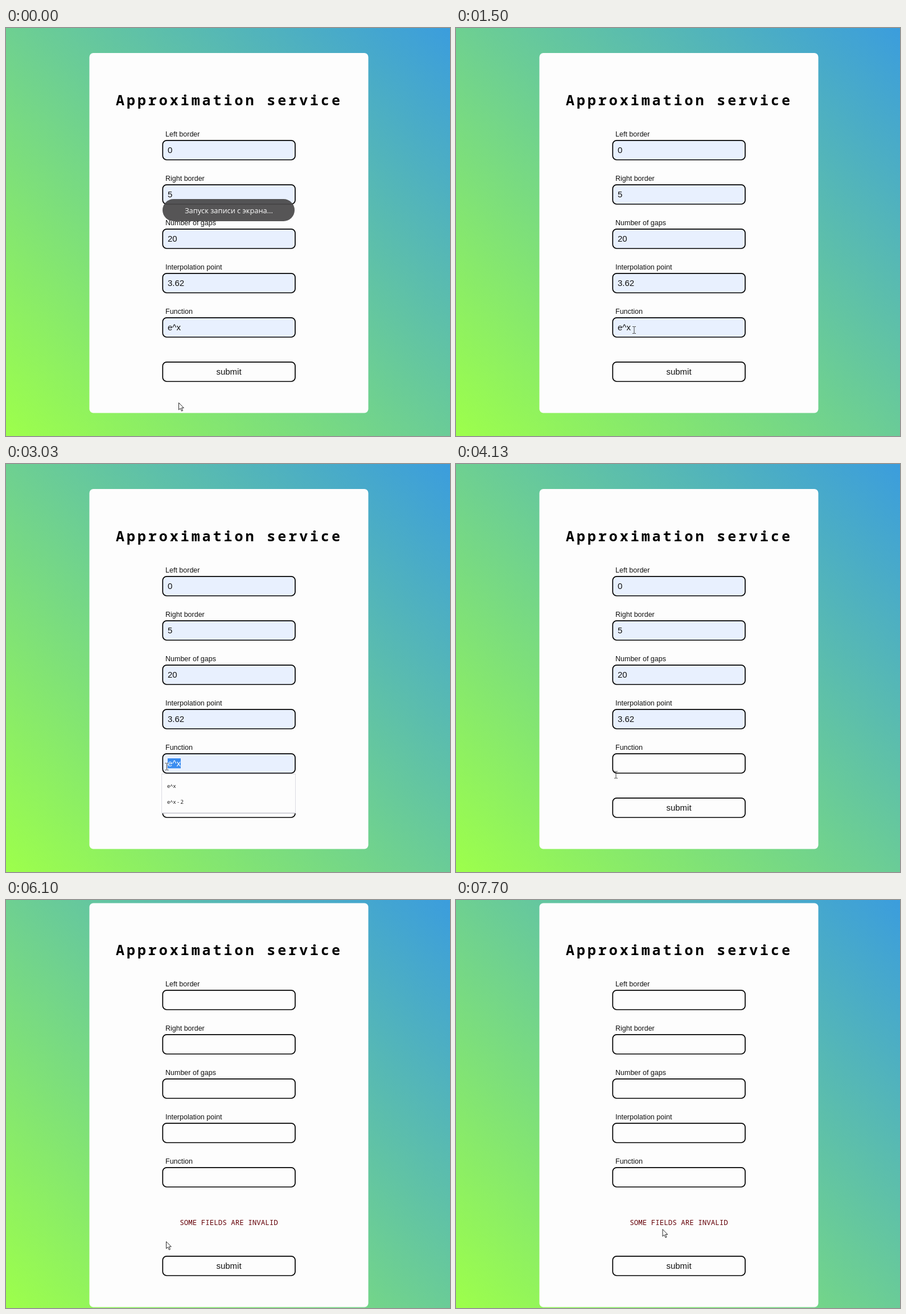
These frames come from a looping animation (780x718 px, 7.73 s). An HTML page:

```html
<!DOCTYPE html>
<html lang="en">
<head>
<meta charset="utf-8">
<title>Approximation service</title>
<style>
  html, body { margin: 0; width: 100%; height: 100%; overflow: hidden; }
  body { background: linear-gradient(45deg, #9dff4b, #3b9ddd); }
  svg { display: block; width: 780px; height: 718px; font-family: "Liberation Sans", Arial, sans-serif; }
  text { fill: #111; white-space: pre; }
  .title { font: 700 25px "Noto Sans Mono", monospace; letter-spacing: 3.95px; fill: #000; }
  .label { font-size: 12.5px; }
  .value { font-size: 15px; }
  .error { font: 500 12.5px "Noto Sans Mono", monospace; fill: #650008; }
  .hint { font: 9.5px "Open Sans", sans-serif; }
  .toast { font: 12.8px "Open Sans", sans-serif; fill: #fff; }
  .box { fill: #fdfdfd; stroke: #000; stroke-width: 1.7; }
  .box.filled { fill: #e8f0fe; }
  .mid { text-anchor: middle; }
</style>
</head>
<body>
<svg viewBox="0 0 780 718">
  <rect id="card" x="146.5" y="44" width="490" height="633.5" rx="7" fill="#fdfdfd"/>
  <g id="form">
    <text class="title" x="193" y="135.5">Approximation service</text>
    <g id="fields"></g>
    <text id="error" class="error mid" x="391.5" y="611">SOME FIELDS ARE INVALID</text>
    <g id="submit">
      <rect class="box" x="275.3" y="587.8" width="232.7" height="34.2" rx="7"/>
      <text class="value mid" x="391.5" y="609.5">submit</text>
    </g>
  </g>
  <g id="selection">
    <rect x="284" y="518" width="23" height="17.5" fill="#3a8cf0"/>
    <text class="value" x="284" y="531.5" style="fill:#fff">e^x</text>
  </g>
  <g id="menu">
    <rect x="273.5" y="545.5" width="235" height="68.5" fill="#fdfdfd" stroke="#dcdce2"/>
    <path d="M274 614.5H509" stroke="#b9b9c4"/>
    <text class="hint" x="283" y="570">e^x</text>
    <text class="hint" x="283" y="598">e^x - 2</text>
  </g>
  <g id="toast">
    <rect x="275" y="301" width="232" height="39" rx="19.5" fill="#484748" fill-opacity=".92"/>
    <text class="toast mid" x="391.5" y="326">Запуск записи с экрана...</text>
  </g>
  <path id="arrow" d="M0 0V12.4L2.9 9.8 5 14.6 7 13.7 4.9 9.1H8.8Z" fill="#fff" stroke="#111" stroke-width=".9"/>
  <path id="beam" d="M-3-6H-.8L0-5.3.8-6H3M0-5.3V5.3M-3 6H-.8L0 5.3.8 6H3" fill="none" stroke="#444"/>
</svg>
<script>
const LOOP = 7730;
const SELECT_START = 1950, SELECT_END = 2450, MENU_OPEN = 1750, CLEARED = 3500, SUBMITTED = 4750;
const $ = id => document.getElementById(id);

const fields = [
  ["Left border", "0"], ["Right border", "5"], ["Number of gaps", "20"],
  ["Interpolation point", "3.62"], ["Function", "e^x"]
];
$("fields").innerHTML = fields.map(([label, value], i) => `
  <g transform="translate(0 ${i * 78})">
    <text class="label" x="280" y="191">${label}</text>
    <rect class="box" x="275.3" y="197.8" width="232.7" height="34.2" rx="7"/>
    <text class="value" x="284" y="219.5">${value}</text>
  </g>`).join("");
const rows = [...$("fields").children];

// Pointer path: time, x, y
const path = [
  [0, 303.5, 659.5], [650, 303.5, 659.5], [1350, 313, 531.5], [SELECT_START, 313, 531.5],
  [SELECT_END, 282.5, 532.5], [3750, 282.5, 532.5], [4130, 281, 547],
  [4450, 281.5, 601], [6900, 281.5, 601], [7500, 363, 579.5], [LOOP, 363, 579.5]
];

function pointer(t) {
  const i = path.findIndex(p => p[0] > t);
  const [t0, x0, y0] = path[i - 1], [t1, x1, y1] = path[i];
  const k = (t - t0) / (t1 - t0), e = k * k * (3 - 2 * k);
  return [x0 + (x1 - x0) * e, y0 + (y1 - y0) * e];
}

const show = (el, on) => el.setAttribute("visibility", on ? "visible" : "hidden");
const move = (el, x, y) => el.setAttribute("transform", `translate(${x} ${y})`);

function draw() {
  const t = performance.now() % LOOP;
  const sent = t >= SUBMITTED;

  move($("form"), 0, sent ? -39 : 0);
  move($("submit"), 0, sent ? 78 : 0);
  $("card").setAttribute("y", sent ? 5.5 : 44);
  $("card").setAttribute("height", sent ? 711 : 633.5);
  show($("error"), sent);

  rows.forEach((row, i) => {
    const filled = t < (i === 4 ? CLEARED : SUBMITTED);
    row.children[1].classList.toggle("filled", filled);
    show(row.children[2], filled);
  });

  const [x, y] = pointer(t);
  const selecting = t >= SELECT_START && t < CLEARED;
  show($("selection"), selecting);
  const left = Math.min(307, Math.max(284, x));
  $("selection").style.clipPath = `polygon(${[[left, 510], [310, 510], [310, 540], [left, 540]]
    .map(([px, py]) => `${px - 284}px ${py - 518}px`)})`;
  show($("menu"), t >= MENU_OPEN && t < CLEARED);
  $("toast").setAttribute("opacity", Math.min(1, Math.max(0, (550 - t) / 250)));

  const typing = !sent && y > 509 && y < 549;
  show($("beam"), typing);
  show($("arrow"), !typing);
  move($("beam"), x, y);
  move($("arrow"), x, y);
  requestAnimationFrame(draw);
}
draw();
</script>
</body>
</html>
```
